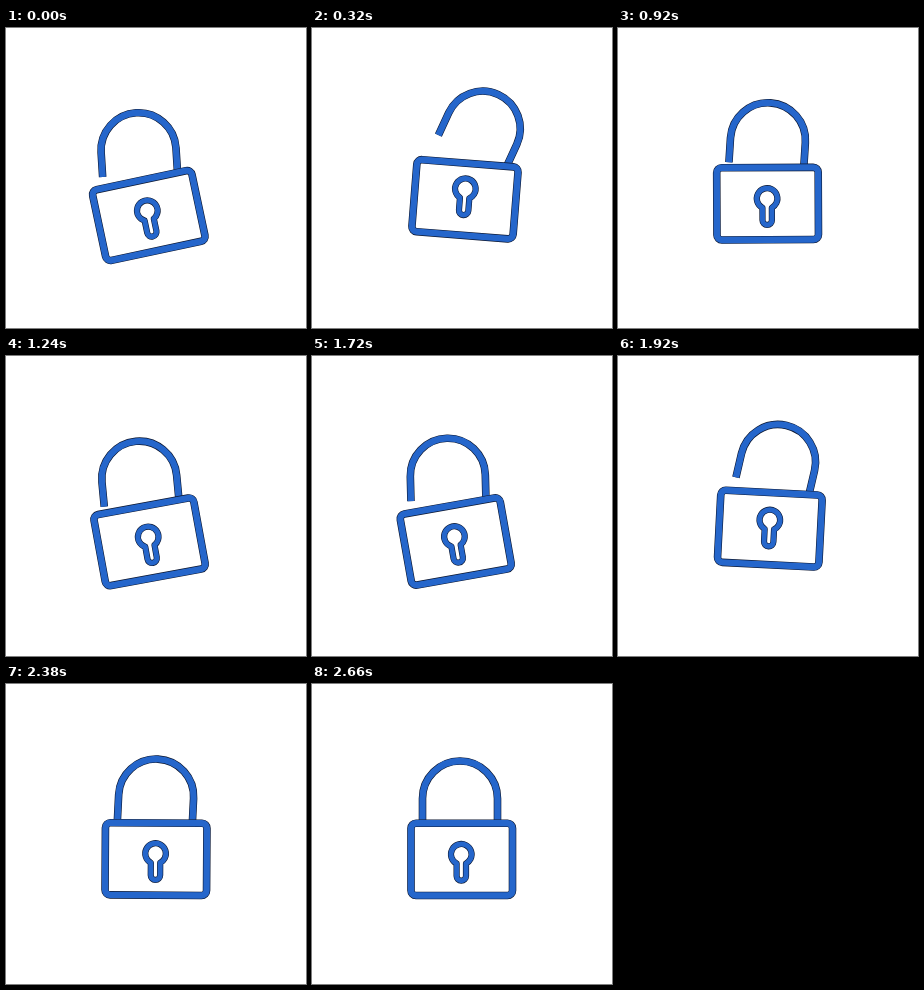
Animation of 300 by 300 pixels, one loop 3040 ms. Source, as an HTML page with a canvas:

```html
<!DOCTYPE html>
<html lang="en">
<head>
<meta charset="utf-8">
<title>Swinging padlock</title>
<style>
  html, body { margin: 0; width: 100%; height: 100%; overflow: hidden; background: #fff; }
  canvas { display: block; width: 300px; height: 300px; }
</style>
</head>
<body>
<canvas id="stage" width="300" height="300"></canvas>
<script>
const ctx = document.getElementById('stage').getContext('2d');
const LOOP = 3040;
const STEP = 20;
const BLUE = '#2566cb';
const EDGE = '#0c1730';
const LEFT = -12;
const RIGHT = 10;
const AJAR = 8.4;

// Moves from one angle through a series of sine-eased legs.
function motion(from, ...legs) {
  return time => {
    let angle = from;
    for (const { start, end, to } of legs) {
      const u = Math.min(1, Math.max(0, (time - start) / (end - start)));
      angle += (to - angle) * (1 - Math.cos(Math.PI * u)) / 2;
    }
    return angle;
  };
}

const bodyTilt = motion(LEFT,
  { start: 0, end: 480, to: RIGHT },
  { start: 480, end: 1400, to: LEFT },
  { start: 1630, end: 2100, to: RIGHT },
  { start: 2100, end: 2510, to: -2.5 },
  { start: 2510, end: 2660, to: 0 });

const shackleSwing = motion(AJAR,
  { start: 0, end: 380, to: 21 },
  { start: 380, end: 1080, to: 1.5 },
  { start: 1080, end: 1400, to: AJAR },
  { start: 1630, end: 2100, to: 11 },
  { start: 2100, end: 2510, to: 0 });

// The keyhole slides up while the body leans to the right.
const keyholeLift = tilt => 1.2 * Math.max(0, tilt);

function rotateAbout(x, y, degrees) {
  ctx.translate(x, y);
  ctx.rotate(degrees * Math.PI / 180);
  ctx.translate(-x, -y);
}

function outline(path, width) {
  ctx.lineJoin = 'round';
  ctx.strokeStyle = EDGE;
  ctx.lineWidth = width + 0.6;
  ctx.stroke(path);
  ctx.strokeStyle = BLUE;
  ctx.lineWidth = width - 0.6;
  ctx.stroke(path);
}

const body = new Path2D();
body.roundRect(99, 139.3, 101.5, 72.2, 5);

const shackle = new Path2D();
shackle.moveTo(110.5, 139);
shackle.arc(148, 114.5, 37.5, Math.PI, 0);
shackle.lineTo(185.5, 139);

function keyholePath(x, y, radius, stem, length) {
  const gap = Math.asin(stem / radius);
  const path = new Path2D();
  path.arc(x, y, radius, Math.PI / 2 + gap, Math.PI * 2.5 - gap);
  path.arc(x, y + length, stem, 0, Math.PI);
  path.closePath();
  return path;
}
const keyhole = keyholePath(149.3, 170.3, 10.3, 4.7, 21.7);

function draw(time) {
  const tilt = bodyTilt(time);
  ctx.fillStyle = '#fff';
  ctx.fillRect(0, 0, 300, 300);
  ctx.save();
  rotateAbout(204, 214.5, tilt);

  ctx.save();
  rotateAbout(185.5, 148, shackleSwing(time));
  outline(shackle, 7);
  ctx.restore();

  outline(body, 7);
  ctx.translate(0, -keyholeLift(tilt));
  outline(keyhole, 5.6);
  ctx.restore();
}

const start = performance.now();
function frame() {
  const time = (performance.now() - start) % LOOP;
  draw(Math.floor(time / STEP) * STEP);
  requestAnimationFrame(frame);
}
draw(0);
requestAnimationFrame(frame);
</script>
</body>
</html>
```
